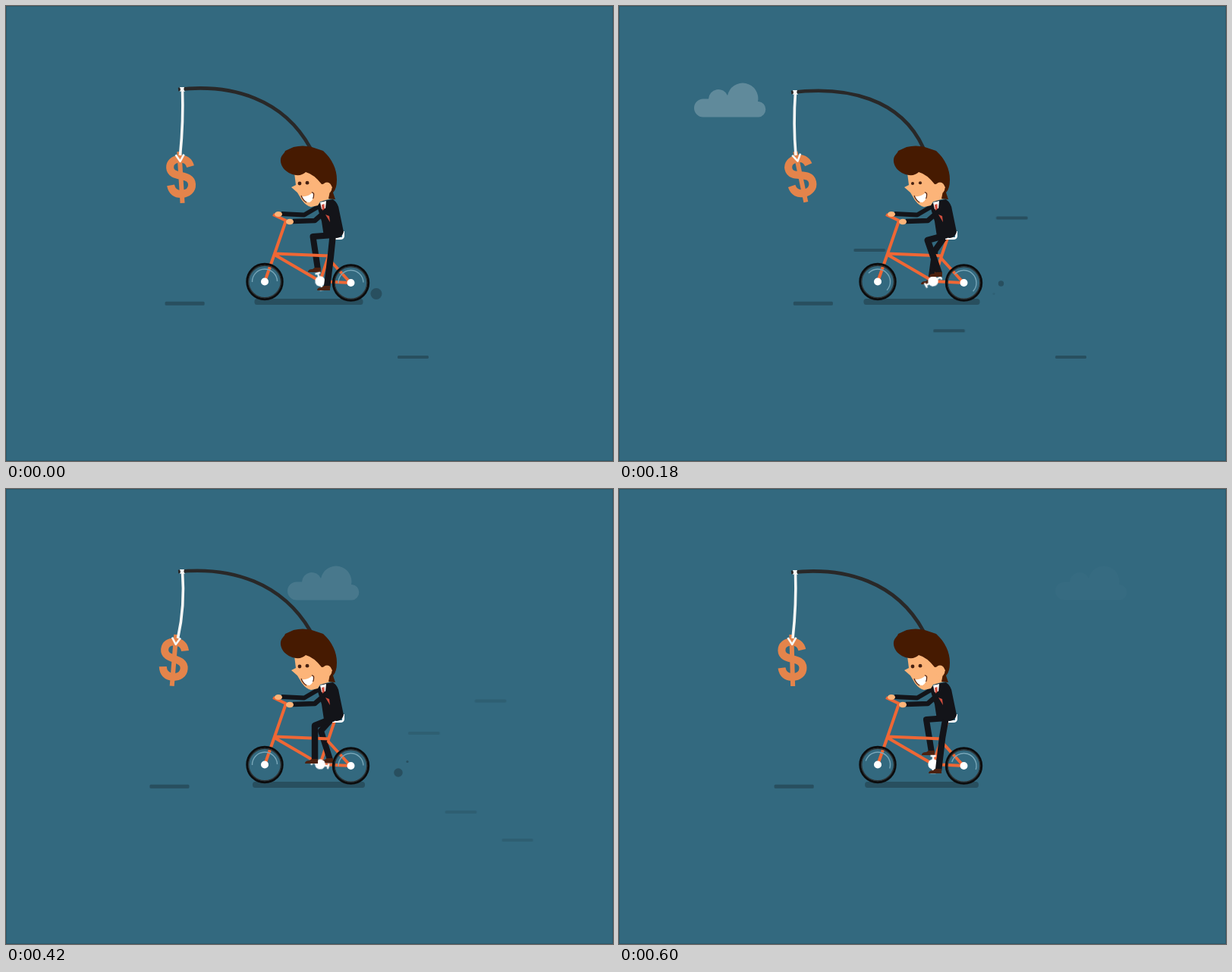
Write an HTML page without scripts that moves like this. It is 800 px wide and 600 px high and loops after 0.63 s.

```html
<!DOCTYPE html>
<html lang="en">
<head>
<meta charset="utf-8">
<title>Chasing the dollar</title>
<style>
  @property --sway   { syntax: "<number>"; inherits: true; initial-value: 0; }
  @property --spread { syntax: "<number>"; inherits: true; initial-value: 1; }
  @property --spin   { syntax: "<angle>";  inherits: true; initial-value: 0deg; }
  @property --tip    { syntax: "<length>"; inherits: true; initial-value: 109px; }

  html, body { margin: 0; height: 100%; overflow: hidden; background: #33697f; }
  svg { display: block; width: 100vw; height: 100vh; animation: ride .63s linear infinite; }

  /* One cycle of the swinging bait, bike shadow and wheels */
  @keyframes ride {
    0%     { --sway: 0;    --spread: .953;  --spin: 0deg;     --tip: 109px; }
    19.05% { --sway: 15;   --spread: .987;  --spin: -180deg;  --tip: 112px; }
    29%    { --sway: 20.5; }
    38.1%  { --sway: 19.5; --spread: 1.053; --spin: -450deg;  --tip: 114px; }
    52.38% { --sway: 0;    --spread: .993;  --spin: -540deg;  --tip: 111px; }
    66.67% { --sway: -20;  --spread: .987;  --spin: -720deg;  --tip: 108px; }
    76.19% { --sway: -23;  --spread: .973;  --spin: -830deg;  --tip: 107px; }
    95.24% { --sway: -5;   --spread: 1;     --spin: -1062deg; --tip: 109px; }
    100%   { --sway: 0;    --spread: .953;  --spin: -1080deg; --tip: 109px; }
  }

  .bike-shadow { transform-origin: 399px 390px; transform: scaleX(var(--spread)); }
  .bait-shadow { transform: translateX(calc(var(--sway) * 1px)); }
  .bait { transform: translate(calc(228.3px + var(--sway) * .2px), 192px) rotate(calc(-3.5deg - var(--sway) * .41deg)); }
  .knot { transform: translate(231px, var(--tip)); }
  .glint { transform: rotate(var(--spin)); }

  .drift { animation: drift .63s steps(21) -1ms infinite; }
  @keyframes drift { to { transform: translate(calc(var(--v) * 21), var(--rise, 0px)); } }
  .dashes { animation: fade .63s linear infinite; }
  @keyframes fade { 0%, 30% { opacity: 1; } 88%, 100% { opacity: 0; } }
  .cloud { fill: #fff; animation: drift .63s steps(21) -1ms infinite, thin .63s linear infinite; }
  @keyframes thin { from { opacity: .31; } to { opacity: 0; } }
  .crank { animation: pedal .63s linear infinite; }
  @keyframes pedal {
    from { transform: translate(414px, 363px) rotate(-16deg); }
    to   { transform: translate(414px, 363px) rotate(-376deg); }
  }
  .eye { fill: #452011; r: 2.4px; animation: squint .63s linear infinite; }
  @keyframes squint { 20%, 52% { r: 2.4px; } 38% { r: 1.7px; } }

  .shade { fill: #284f5f; }
  .skin { fill: #fcb479; }
  .hair { fill: #461a01; }
  .suit { fill: #131419; }
  .tie { fill: #cf4d3e; }
  .limb, .tube, .line, .dollar { fill: none; stroke-linejoin: round; }
  .limb { stroke: #131419; }
  .tube { stroke: #ef6735; stroke-width: 4; }
  .line { stroke: #f7f7f5; }
  .dollar { stroke: #e4844b; }
</style>
</head>
<body>
<svg viewBox="0 0 800 600">
  <defs>
    <g id="wheel">
      <circle r="23.200" fill="none" stroke="#0c0c0d" stroke-width="3"/>
      <circle r="21.200" fill="none" stroke="#2e3132" stroke-width="1.200"/>
      <path class="glint" d="M-16.500 0A16.500 16.500 0 0 1 16.500 0" fill="none" stroke="#78a6b8" stroke-width="1.400"/>
      <circle r="5" fill="#fff"/>
    </g>
    <marker id="shoe" markerUnits="userSpaceOnUse" markerWidth="24" markerHeight="16" refX="14" refY="5" orient="0">
      <path d="M10 3H18V9H1Q1 5 7 5Z" fill="#4b2110"/>
    </marker>
  </defs>

  <rect width="800" height="600" fill="#33697f"/>

  <g class="cloud" style="--v:34px">
    <path d="M-93 146.500A11.500 11.500 0 0 1 -93 122.500H-86A13 13 0 0 1 -61 118A20 20 0 0 1 -21 126H-20A10.300 10.300 0 0 1 -20 146.500Z"/>
  </g>

  <g class="dashes shade">
    <rect class="drift" style="--v:9.830px" x="516" y="461" width="41" height="4" rx="1.500"/>
    <g>
      <animate attributeName="visibility" values="hidden;visible" keyTimes="0;.09" calcMode="discrete" dur=".63s" repeatCount="indefinite"/>
      <rect class="drift" style="--v:20.550px;--rise:-6px" x="291" y="428" width="41.500" height="4" rx="1.500"/>
      <rect class="drift" style="--v:27.580px" x="144" y="320" width="41.500" height="4" rx="1.500"/>
    </g>
    <g>
      <animate attributeName="visibility" values="hidden;visible" keyTimes="0;.285" calcMode="discrete" dur=".63s" repeatCount="indefinite"/>
      <rect class="drift" style="--v:15.100px" x="406.500" y="277.500" width="41.500" height="4" rx="1.500"/>
    </g>
  </g>

  <g class="shade" style="--v:1px">
    <circle class="drift" cx="488" cy="379.500">
      <animate attributeName="r" values="7.5;4.5;0;0" keyTimes="0;.1905;.34;1" dur=".63s" repeatCount="indefinite"/>
      <animate attributeName="opacity" values="1;.5;.2;1" keyTimes="0;.1905;.34;1" dur=".63s" repeatCount="indefinite"/>
    </circle>
    <circle class="drift" cx="497.500" cy="366">
      <animate attributeName="r" values="0;0;6;4.7;2.7;.7;0;0" keyTimes="0;.094;.095;.1905;.381;.5238;.58;1" dur=".63s" repeatCount="indefinite"/>
    </circle>
    <circle class="drift" cx="515" cy="359.500">
      <animate attributeName="r" values="0;0;3.5;2.6;1.6;.8;0;0" keyTimes="0;.427;.428;.5238;.6667;.7619;.85;1" dur=".63s" repeatCount="indefinite"/>
    </circle>
    <circle class="drift" cx="503" cy="374">
      <animate attributeName="r" values="0;0;7;5.8;4.1;0;0" keyTimes="0;.617;.618;.6667;.7619;.94;1" dur=".63s" repeatCount="indefinite"/>
    </circle>
    <rect class="bike-shadow" x="324" y="386" width="150" height="8" rx="3.500"/>
    <rect class="bait-shadow" x="209.500" y="389.800" width="52" height="5" rx="1.500"/>
  </g>

  <!-- Rod, string and bait -->
  <path fill="none" stroke="#292828" stroke-width="4.600">
    <animate attributeName="d" dur=".63s" repeatCount="indefinite" keyTimes="0;.1905;.381;.5238;.6667;.7619;.9524;1" values="
      M227 110C299 102 366 123 401 187;
      M227 113C300 104 370 122 401 187;
      M227 115C300 106 373 122 401 187;
      M227 112C299 103 368 123 401 187;
      M227 109C298 102 364 124 401 187;
      M227 108C298 101 363 124 401 187;
      M227 110C299 102 366 123 401 187;
      M227 110C299 102 366 123 401 187"/>
  </path>
  <g class="bait">
    <path class="dollar" stroke-width="6" d="M0 0V68"/>
    <path class="dollar" stroke-width="10" d="M13.500 20.500C12 13 7 9.500 0 9.500C-8 9.500 -13.500 14 -13.500 20.500C-13.500 36 14 28 14 44C14 51.500 8 56 0 56C-8 56 -13 52 -14 43.500"/>
    <path class="line" stroke-width="2.600" d="M-5 4L.5 13L6 4"/>
  </g>
  <path class="line" stroke-width="3.600">
    <animate attributeName="d" dur=".63s" repeatCount="indefinite" keyTimes="0;.1905;.381;.5238;.6667;.7619;.9524;1" values="
      M232.500 109Q234 152 229.500 197;
      M232.500 112Q230 155 232.500 197;
      M232.500 114Q229 155 233.500 197;
      M232.500 111Q234 152 229.500 197;
      M232.500 108Q236 155 226.500 197;
      M232.500 107Q237 155 225.500 197;
      M232.500 109Q234 152 229 197;
      M232.500 109Q234 152 229.500 197"/>
  </path>
  <path class="knot" d="M-2 -2H4L3 1L5 4L1 3L-2 4L-1 1Z" fill="#f7f7f5"/>

  <!-- Far leg, bike, near leg -->
  <path class="tube" d="M433 306L414 363"/>
  <path class="limb" stroke-width="8" marker-end="url(#shoe)">
    <animate attributeName="d" dur=".63s" repeatCount="indefinite" keyTimes="0;.1905;.381;.5238;.6667;.7619;.9524;1" values="
      M432 302L404.500 304L411 347;
      M432 302L409 314L409 359;
      M430 302L424 330L413 367;
      M430 302L426 332L423 369;
      M430 302L415 319L427 357;
      M430 302L417 317L429 350;
      M432 302L405 304L412 347;
      M432 302L404.500 304L411 347"/>
  </path>
  <path d="M430 305H443L443.500 297H446V304Q445 308 441 308H430Z" fill="#fff"/>
  <g class="tube">
    <path d="M352 275L369 283L353.500 328L341 363.500"/>
    <path d="M354 326.500L426 329.500M354 328L414 363L454 365L424 332"/>
  </g>
  <g class="crank">
    <path class="line" stroke-width="2.600" d="M0 -11V11M-3.500 -11H3.500M-3.500 11H3.500"/>
    <circle r="6.700" fill="#fff"/>
  </g>
  <path class="limb" stroke-width="8.500" marker-end="url(#shoe)">
    <animate attributeName="d" dur=".63s" repeatCount="indefinite" keyTimes="0;.1905;.381;.5238;.6667;.7619;.9524;1" values="
      M431 300L428 331L423 371;
      M432 302L409 315L425 359;
      M432 302L404.500 303L419 347;
      M432 302L404.500 303L409 348;
      M432 302L407 312L407 358;
      M432 302L409 313L410 365;
      M431 300L426 328L421 371;
      M431 300L428 331L423 371"/>
  </path>
  <use href="#wheel" x="341" y="363.500"/>
  <use href="#wheel" x="454.500" y="365"/>

  <!-- Rider -->
  <path class="limb" stroke-width="6" d="M416 262L393 275.500L363 274"/>
  <ellipse class="skin" cx="359" cy="274.500" rx="5" ry="3.600"/>
  <path class="suit" d="M410 264L418 257L431 255Q438 260 439 269L445 298Q443 305 436 306L419 304L416 284Z"/>
  <path d="M414 259L422 257L421 267L416 268Z" fill="#fff"/>
  <path class="tie" d="M416 262L419.500 261L420 269L417 270Z"/>
  <path class="limb" stroke-width="6.500" d="M423 269L407 283L378 284"/>
  <path class="tie" d="M421 275L426 277L427 285Z"/>
  <ellipse class="skin" cx="374" cy="284.500" rx="5" ry="3.800"/>

  <path class="skin" d="M380 220L382 236L376 239L384 246L390 256Q396 264 402 265L411 263L414 258L428 254L431 240L418 221L396 216Z"/>
  <path class="hair" d="M382 223C369 221 361 211 362 202C363 196 366 196 368 191L379 186Q391 183 403 186L418 191C430 202 436 215 436 229Q436 241 431 246L434 255L425 254L427 244L430 239Q426 233 416 235Q406 222 395 219Q390 224 382 223Z"/>
  <ellipse class="skin" cx="423" cy="240" rx="6.500" ry="7.500"/>
  <circle class="eye" cx="387" cy="234"/>
  <circle class="eye" cx="397" cy="233.200"/>
  <path d="M390 251Q398 252 404 246Q407 255 400 259Q394 259 390 251Z" fill="#fff"/>
  <path d="M389 250Q391 256 396 259M403 245.500L405.500 247Q406 251 404.500 254" fill="none" stroke="#512619" stroke-width="1.200"/>

  <rect x=".5" y=".5" width="799" height="599" fill="none" stroke="#2b596c"/>
</svg>
</body>
</html>
```
